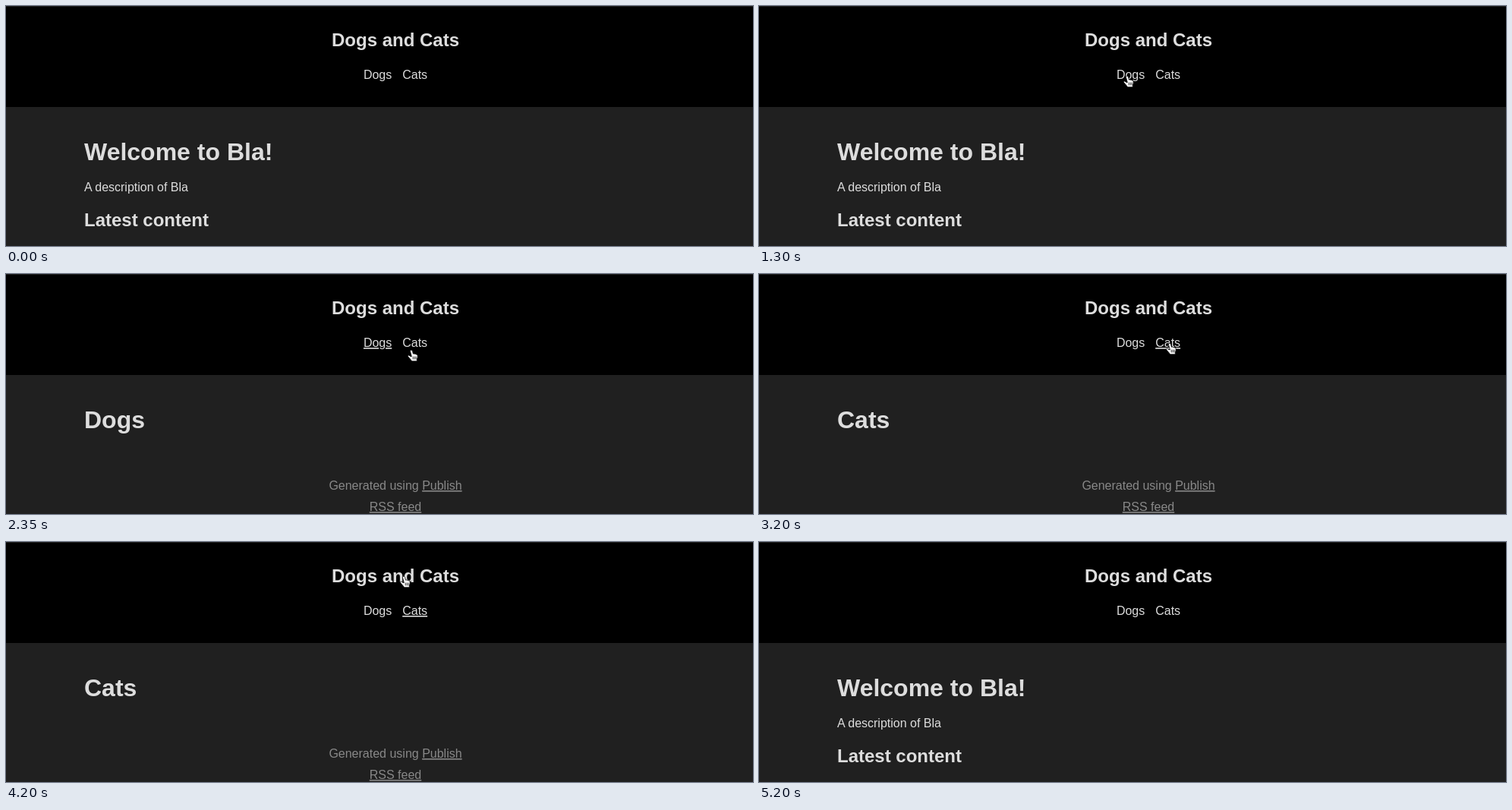
Recreate the animation shown at these times as an HTML page. Size 984 px wide and 316 px high, loop 5.65 s.

```html
<!DOCTYPE html>
<html lang="en">
<head>
<meta charset="utf-8">
<title>Dogs and Cats</title>
<style>
  html, body { margin: 0; width: 100%; height: 100%; overflow: hidden; background: #202020; }
  svg { display: block; font: 16px "Liberation Sans", Arial, sans-serif; fill: #ddd; }
  .h1 { font-size: 32px; font-weight: bold; }
  .h2 { font-size: 24px; font-weight: bold; }
  .mid { text-anchor: middle; }
  .u { text-decoration: underline; }
  #footer { fill: #888; }
</style>
</head>
<body>
<svg width="984" height="316" viewBox="0 0 984 316">
  <rect width="984" height="316" fill="#202020"/>
  <rect y="1" width="984" height="132" fill="#000"/>

  <text class="h2 mid" x="513" y="53">Dogs and Cats</text>
  <text id="navDogs" x="470.9" y="96">Dogs</text>
  <text id="navCats" x="522.2" y="96">Cats</text>

  <text id="heading" class="h1" x="103" y="203"></text>
  <g id="intro">
    <text x="103" y="244">A description of Bla</text>
    <text class="h2" x="103" y="290">Latest content</text>
  </g>
  <g id="footer" class="mid">
    <text x="513" y="284">Generated using <tspan class="u">Publish</tspan></text>
    <text class="u" x="513" y="312">RSS feed</text>
  </g>

  <g id="cursor">
    <path id="arrow" d="M.5 .5V14.2L3.7 11.2L6 16.6L8.4 15.6L6.1 10.3H10.3Z"
          fill="#000" stroke="#fff" stroke-width="1.1"/>
    <g id="hand" stroke="#000" stroke-linecap="round" stroke-linejoin="round">
      <path fill="#fff" stroke-width=".8"
            d="M-1.6 1.2Q-1.4 0 0 .1Q1.2 .3 1.5 1.5L2.4 5.2Q3.6 4.4 4.5 5.5Q5.8 4.9 6.5 6
               Q8.1 5.7 8.2 7.5Q8.4 10.5 7.3 12.3V14.8H.6Q-.6 12.8-2.2 11.2L-4.4 8.7
               Q-5.2 7.2-4 6.9Q-3 6.7-1.2 8.5L0 8.6Z"/>
      <path fill="none" stroke-width=".8" d="M2.2 9V12M4.2 9V12M6.1 9V12"/>
    </g>
  </g>
</svg>
<script>
const LOOP = 5650, TICK = 50;
const el = id => document.getElementById(id);

const pages = [
  { from: 0, heading: "Welcome to Bla!", home: true },
  { from: 1350, heading: "Dogs" },
  { from: 2600, heading: "Cats" },
  { from: 4350, heading: "Welcome to Bla!", home: true }
];

const smooth = k => k * k * (3 - 2 * k);
const slowDown = k => 1 - (1 - k) ** 2;
const speedUp = k => k * k;

// Pointer stops: time, x, y, easing towards the stop
const stops = [
  [0, 506, 325], [800, 475, 100, slowDown], [1050, 485, 92, smooth],
  [1600, 485, 92, smooth], [2350, 534, 100, smooth], [2400, 534, 100, smooth],
  [2800, 551, 86, smooth], [3200, 541, 91, smooth], [3250, 541, 91, smooth],
  [3400, 536, 81, speedUp], [3800, 524, 45, slowDown],
  [4900, 524, 45, smooth], [5150, 943, 0, speedUp]
];

function pointerAt(t) {
  const next = stops.findIndex(s => s[0] > t);
  if (next < 0) return stops.at(-1).slice(1, 3);
  const [t0, x0, y0] = stops[next - 1], [t1, x1, y1, ease] = stops[next];
  const k = ease((t - t0) / (t1 - t0));
  return [x0 + (x1 - x0) * k, y0 + (y1 - y0) * k];
}

function overLink(x, y) {
  const onTitle = x >= 429 && x <= 597 && y >= 31 && y <= 58;
  const onNav = y >= 80 && y <= 100 &&
    ((x > 476 && x <= 508) || (x >= 522 && x <= 555));
  return onTitle || onNav;
}

const show = (id, on) => el(id).style.display = on ? "" : "none";

function render(t) {
  const page = pages.findLast(p => p.from <= t);
  el("heading").textContent = page.heading;
  show("intro", page.home);
  show("footer", !page.home);
  for (const name of ["Dogs", "Cats"])
    el("nav" + name).classList.toggle("u", page.heading === name);

  const [x, y] = pointerAt(t);
  const hand = overLink(x, y);
  show("cursor", t >= 50 && t < 5200);
  show("hand", hand);
  show("arrow", !hand);
  el("cursor").setAttribute("transform", `translate(${Math.round(x)} ${Math.round(y)})`);
}

const start = performance.now();
function frame() {
  const t = (performance.now() - start) % LOOP;
  render(Math.floor(t / TICK) * TICK);
  requestAnimationFrame(frame);
}
frame();
</script>
</body>
</html>
```
